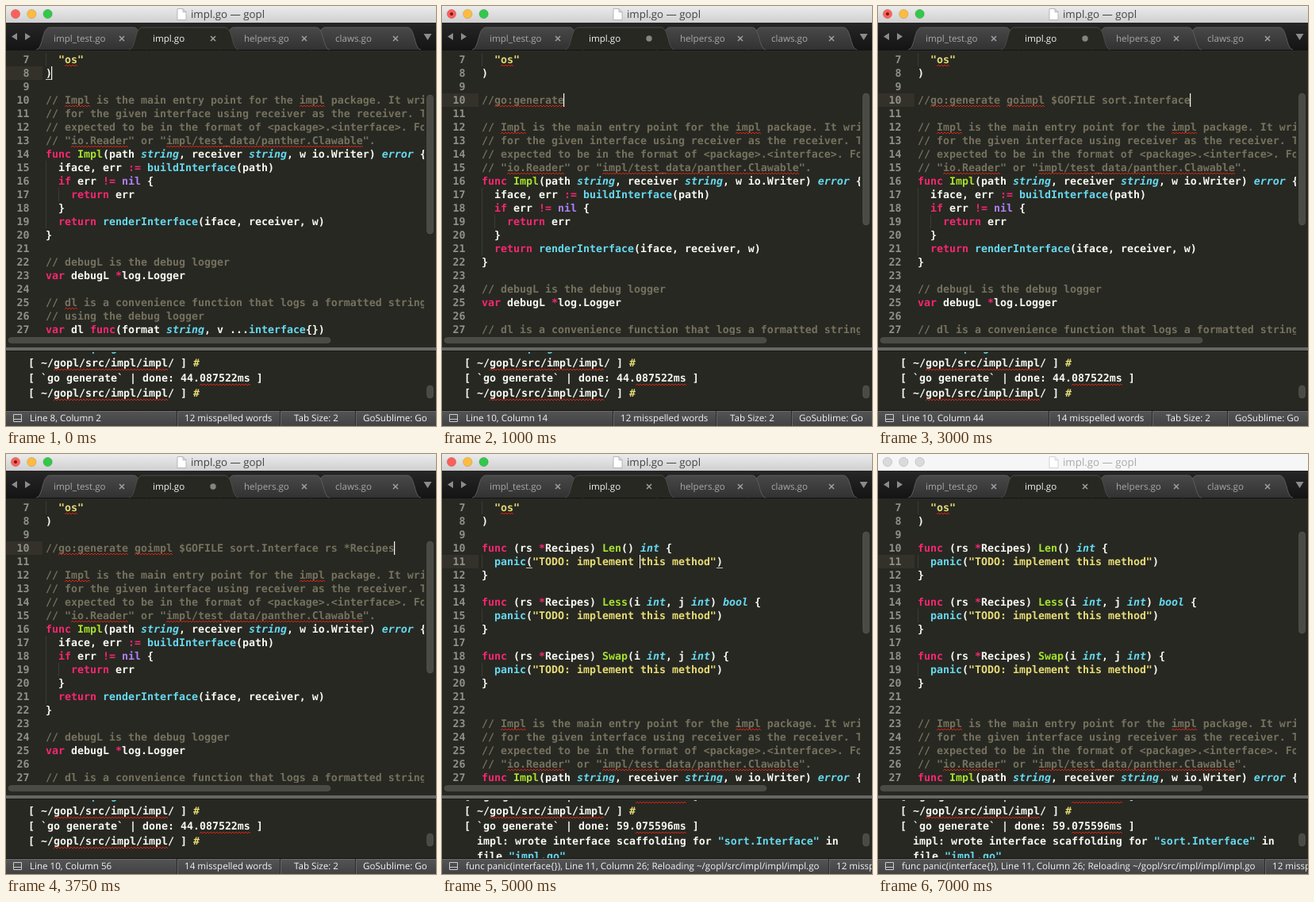
These frames come from a looping animation (542x529 px, 8250 ms). An HTML page:

```html
<!DOCTYPE html>
<html lang="en">
<head>
<meta charset="utf-8">
<title>Code generation in an editor</title>
<style>
html, body { margin: 0; width: 100%; height: 100%; overflow: hidden; background: #272822; }
svg { display: block; }
text { white-space: pre; text-rendering: geometricPrecision; font: 11.6px "Open Sans", sans-serif; }
.title { font-size: 13.3px; }
.mono { font: bold 13.29px "DejaVu Sans Mono", monospace; fill: #f8f8f2; }
.gutter { fill: #8f908a; text-anchor: end; }
.comment { fill: #75715e; }
.string { fill: #e6db74; }
.keyword { fill: #f92672; }
.type { fill: #66d9ef; font-style: italic; }
.constant { fill: #ae81ff; }
.call { fill: #66d9ef; }
.name { fill: #a6e22e; }
.thumb { fill: #4a4b45; stroke: #585952; stroke-width: .6; }
.status { fill: #f2f2f2; font-weight: 500; }
</style>
</head>
<body>
<svg id="stage" width="542" height="529" viewBox="0 0 542 529"></svg>
<script>
const LOOP = 8250, TICK = 250, CHAR = 8, LEFT = 50, ROW = 17;
const stage = document.getElementById('stage');

const directive = '//go:generate goimpl $GOFILE sort.Interface rs *Recipes';
// [time, characters typed]
const typing = [[500, 0], [750, 6], [1000, 13], [1500, 20], [1750, 26], [2250, 31],
  [2500, 36], [2750, 40], [3000, 43], [3250, 46], [3500, 50], [3750, 55]];

const head = ['  "os"', ')', ''];
const body = `// Impl is the main entry point for the impl package. It writes
// for the given interface using receiver as the receiver. The
// expected to be in the format of <package>.<interface>. For
// "io.Reader" or "impl/test_data/panther.Clawable".
func Impl(path string, receiver string, w io.Writer) error {
  iface, err := buildInterface(path)
  if err != nil {
    return err
  }
  return renderInterface(iface, receiver, w)
}

// debugL is the debug logger
var debugL *log.Logger

// dl is a convenience function that logs a formatted string
// using the debug logger
var dl func(format string, v ...interface{})`.split('\n');
const methods = ['Len() int', 'Less(i int, j int) bool', 'Swap(i int, j int)'].flatMap(signature => [
  `func (rs *Recipes) ${signature} {`, '  panic("TODO: implement this method")', '}', '']);

const syntax = new RegExp([
  '(?<comment>//.*)', '(?<string>"[^"]*")', '(?<keyword>\\b(?:func|if|return|var)\\b|:=|!=|\\*)',
  '(?<type>\\b(?:string|int|bool|error)\\b)', '(?<constant>\\bnil\\b)',
  '(?<call>\\b(?:panic|buildInterface|renderInterface|interface)\\b)',
  '(?<name>\\b(?:Impl|Len|Less|Swap)(?=\\())'].join('|'), 'g');
const misspelt = /\bos\b|Impl(?= is)|impl(?= package)|\bdl(?= is)|go:generate|goimpl|io\.Reader|impl\/test_data\/panther\.Clawable/g;
const misspeltOutput = /gopl\/src\/impl\/impl|\d+ms/g;

const prompt = '[ ~/gopl/src/impl/impl/ ] #';
const done = ms => `[ \`go generate\` | done: ${ms}ms ]`;
const waiting = '[ `go generate`    ]';
const written = ['  impl: wrote interface scaffolding for "sort.Interface" in', '  file "impl.go"'];
const firstRun = [written[1], prompt, done('44.087522'), prompt];

const escape = s => s.replace(/&/g, '&amp;').replace(/</g, '&lt;').replace(/>/g, '&gt;');
const span = (kind, s) => `<tspan class="${kind}">${s}</tspan>`;
const text = (x, y, s, attrs = '') => `<text x="${x}" y="${y}" ${attrs}>${s}</text>`;
const rect = (x, y, w, h, fill, more = '') =>
  `<rect x="${x}" y="${y}" width="${w}" height="${h}" fill="${fill}" ${more}/>`;
const circle = (x, y, r, fill, more = '') => `<circle cx="${x}" cy="${y}" r="${r}" fill="${fill}" ${more}/>`;
const thumb = (x, y, w, h) => rect(x, y, w, h, '', 'rx="4" class="thumb"');
const path = (d, attrs) => `<path d="${d}" ${attrs}/>`;
const stroke = (d, colour, width = 1) => path(d, `fill="none" stroke="${colour}" stroke-width="${width}"`);
const gradient = (id, from, to) => `<linearGradient id="${id}" x2="0" y2="1">
  <stop stop-color="${from}"/><stop offset="1" stop-color="${to}"/></linearGradient>`;
const clip = (id, x, y, w, h) => `<clipPath id="${id}">${rect(x, y, w, h, '#000')}</clipPath>`;
const rowTop = line => 59 + (line - 7) * ROW;

const squiggles = (s, pattern, x, y) => [...s.matchAll(pattern)].map(m =>
  stroke(`M${x + m.index * CHAR} ${y}` + 'l2 -2l2 2'.repeat(m[0].length * CHAR / 4), '#e02010')).join('');

function highlight(s) {
  return escape(s).replace(syntax, (token, ...rest) => {
    const groups = rest.at(-1);
    return span(Object.keys(groups).find(kind => groups[kind]), token);
  });
}

function stateAt(t) {
  const active = t < 7000, reloaded = t >= 5000, saved = t >= 4250;
  const typed = directive.slice(0, (typing.findLast(step => step[0] <= t) || [0, 0])[1]);
  const state = {
    active, dirty: t >= 250 && !saved, line: 10, column: typed.length,
    words: typed.length >= 20 && !reloaded ? 14 : 12, shift: 0,
    brackets: [], scroll: [110, 166], console: firstRun,
    caret: t < 4500 || [5000, 5250, 5750, 6000, 6750].includes(t),
    lines: [...head, typed, '', ...body]
  };
  if (t < 250) Object.assign(state, {
    line: 8, column: 1, brackets: [0], scroll: [112, 175], lines: [...head, ...body] });
  else if (t < 500) Object.assign(state, { line: 9, lines: [...head, '', ...body] });
  if (reloaded) Object.assign(state, {
    line: 11, column: 25, brackets: active ? [7, 37] : [], scroll: [98, 128],
    lines: [...head, ...methods, '', ...body] });
  if (t >= 4750) state.console = [firstRun[2], prompt, done('59.075596'), ...written];
  else if (t >= 4500) state.console = [firstRun[2], prompt, waiting, prompt];

  const file = '~/gopl/src/impl/impl/impl.go';
  state.status = `Line ${state.line}, Column ${state.column + 1}`;
  if (reloaded) {
    state.status = `func panic(interface{}), ${state.status}; Reloading ${file}`;
    state.shift = 272;
  } else if (saved) {
    state.status += `; Saved ${file} (UTF-8)`;
    state.shift = 169;
  }
  return state;
}

function titleBar({ active, dirty }) {
  const lights = active ? ['#fc605b', '#fdbc40', '#34c84a'] : Array(3).fill('#dadada');
  return rect(0, 0, 542, 21, active ? 'url(#bar)' : '#f6f6f6') +
    lights.map((c, i) => circle(12 + i * 20.3, 10, 5.7, c, 'stroke="#000" stroke-opacity=".13"')).join('') +
    (dirty ? circle(12, 10, 2, '#7a1512') : '') +
    path('M216 3.5h7l4 4v10h-11zM223 3.5v4h4', `fill="#fff" stroke="${active ? '#aaa' : '#ccc'}" stroke-width=".8"`) +
    text(233, 15, 'impl.go — gopl', `class="title" fill="${active ? '#444' : '#aaa'}"`);
}

function tab(label, i, x, dirty) {
  const current = i === 1, left = i ? 40 + i * 115 : 38, right = 178 + i * 115, cross = 146 + i * 115;
  const shape = `M${left} 55C${left + 9} 54 ${left + 7} 27 ${left + 17} 27H${right - 17}C${right - 7} 27 ${right - 9} 54 ${right} 55`;
  return path(shape, `fill="${current ? '#272822' : 'url(#tab)'}" stroke="${current ? '#4b4c47' : '#5c5c5c'}"`) +
    text(x, 45, label, `fill="${current ? '#f2f2f2' : '#a8a8a8'}"`) +
    (current && dirty ? circle(cross, 41, 3.7, '#85857f')
      : stroke(`M${cross - 3} 38l6 6m0 -6l-6 6`, '#a0a0a0', 1.5));
}

function tabStrip({ dirty }) {
  const tabs = [['impl_test.go', 60], ['impl.go', 185], ['helpers.go', 300], ['claws.go', 415]]
    .map(([label, x], i) => tab(label, i, x, dirty));
  return rect(0, 21, 542, 35, 'url(#strip)') +
    path('M14 34v9l-7 -4.500zM24 34v9l7 -4.500zM526.500 35h10l-5 8z', 'fill="#8b8b8b"') +
    tabs[0] + tabs[3] + tabs[2] + tabs[1];
}

function codeRow(s, line) {
  const y = rowTop(line), indent = s.search(/\S/);
  let guides = '';
  for (let i = 0; i < indent; i += 2) guides += `M${LEFT + i * CHAR + .5} ${y}v${ROW}`;
  return stroke(guides, '#3b3c34') + text(LEFT, y + 13, highlight(s), 'class="mono"') +
    squiggles(s, misspelt, LEFT, y + 17);
}

function editor({ lines, line, column, caret, brackets, scroll }) {
  const y = rowTop(line), shown = lines.slice(0, 21);
  return rect(0, 56, 542, 376, '#272822') + '<g clip-path="url(#page)">' +
    rect(0, y, 46, ROW, '#33312a') +
    shown.map((s, i) => text(29.500, rowTop(i + 7) + 13, i + 7, 'class="mono gutter"')).join('') +
    '<g clip-path="url(#code)">' + shown.map((s, i) => codeRow(s, i + 7)).join('') +
    brackets.map(c => rect(LEFT + c * CHAR, y + 16, CHAR, 1, '#c8c8b8')).join('') +
    (caret ? rect(LEFT + column * CHAR - 1, y, 1.2, ROW, '#f8f8f0') : '') + '</g></g>' +
    thumb(530.500, scroll[0], 8, scroll[1]) + thumb(3, 417.500, 406, 7);
}

function consoleRow(s, i) {
  const x = 28, y = 435 + i * 19;
  const coloured = s.replace(/#|"[^"]*"/g, m => span(m === '#' ? 'string' : 'call', m));
  const hourglass = path(`M159 ${y - 11}h8l-4 6zm4 6l4 6h-8z`, 'fill="#d8c9a0" stroke="#eee" stroke-width=".8"') +
    stroke(`M158 ${y - 11.5}h10m-10 13h10`, '#a08468', 1.5);
  return text(x, y, coloured, 'class="mono"') + (s === waiting ? hourglass : '') +
    squiggles(s, misspeltOutput, x, y + 5);
}

function consolePanel(state) {
  return rect(0, 430, 542, 4, '#666') + rect(0, 434, 542, 76, '#272822') + rect(0, 434, 542, 1, '#181915') +
    `<g clip-path="url(#console)">${state.console.map(consoleRow).join('')}</g>` +
    thumb(530.500, 478, 8, 16);
}

function statusBar({ status, words, shift }) {
  const label = (x, s) => text(x, 523, s, 'class="status"');
  const divider = x => rect(x, 510, 1, 19, '#2b2b2b') + rect(x + 1, 510, 1, 19, '#666');
  return rect(0, 509, 542, 20, 'url(#foot)') + rect(0, 509, 542, 1, '#151515') + rect(0, 510, 542, 1, '#6c6c6c') +
    stroke('M9.500 514.500h10v9h-10zM9.500 520.500h10', '#ccc') + label(30, status) +
    `<g transform="translate(${shift})">` + [215, 345, 440].map(divider).join('') +
    label(225, `${words} misspelled words`) + label(363, 'Tab Size: 2') + label(450, 'GoSublime: Go') + '</g>';
}

const defs = '<defs>' + gradient('bar', '#ebebeb', '#d0d0d0') + gradient('strip', '#262626', '#141414') +
  gradient('tab', '#484848', '#323232') + gradient('foot', '#555', '#424242') +
  clip('page', 0, 56, 528, 358) + clip('code', 46, 56, 481, 358) + clip('console', 0, 436, 528, 73) + '</defs>';

let shownTick = -1;
function frame() {
  const tick = Math.floor(performance.now() % LOOP / TICK);
  if (tick !== shownTick) {
    shownTick = tick;
    const state = stateAt(tick * TICK);
    stage.innerHTML = defs + [titleBar, tabStrip, editor, consolePanel, statusBar].map(draw => draw(state)).join('');
  }
  requestAnimationFrame(frame);
}
frame();
</script>
</body>
</html>
```
